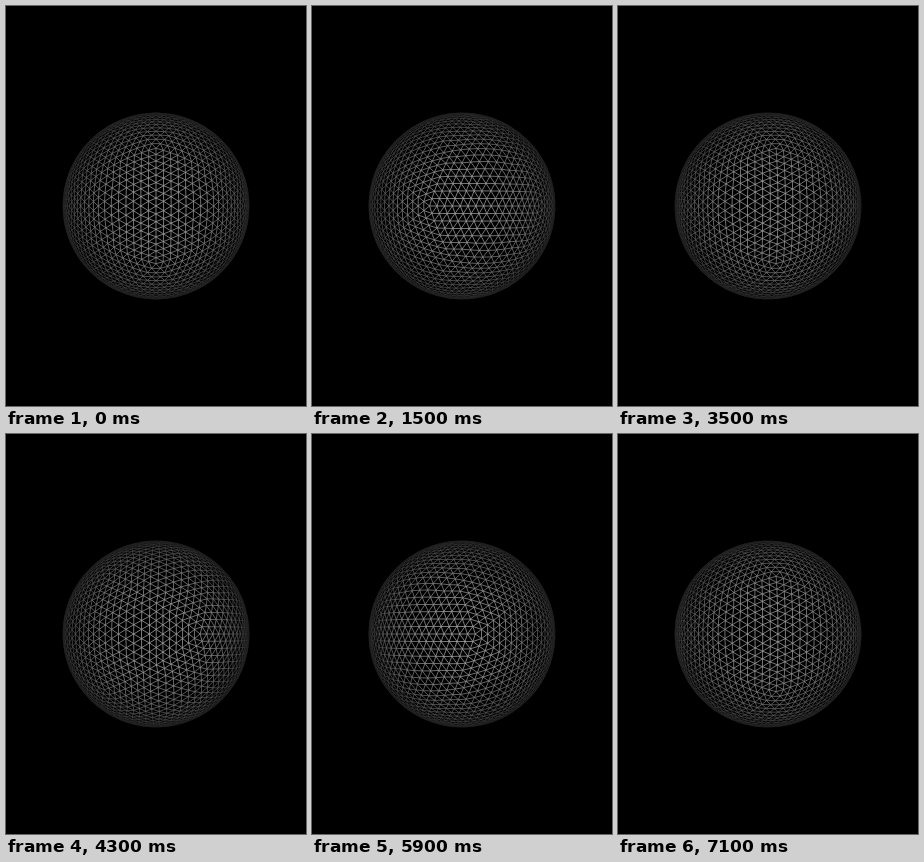
Recreate the animation shown at these times as an HTML page with a canvas. Size 300 by 400 pixels, loop 7.2 s.

```html
<!DOCTYPE html>
<html>
<head>
<meta charset="utf-8">
<style>
html, body { margin: 0; height: 100%; overflow: hidden; background: #000; }
canvas { display: block; }
</style>
</head>
<body>
<canvas id="stage" width="300" height="400"></canvas>
<script>
const ctx = document.getElementById('stage').getContext('2d');
const RADIUS = 93, CAMERA = 5, LEVELS = 4;
const STEP_MS = 100, STEPS = 72;
const FOCAL = RADIUS * Math.sqrt(CAMERA * CAMERA - 1);

const phi = (1 + Math.sqrt(5)) / 2;
const corners = [];
for (const a of [-1, 1]) for (const b of [-phi, phi])
  corners.push([0, a, b], [a, b, 0], [b, 0, a]);

const normalize = p => p.map(v => v / Math.hypot(...p));
const midpoint = (p, q) => normalize(p.map((v, i) => v + q[i]));
const adjacent = (p, q) => Math.abs(Math.hypot(...p.map((v, i) => v - q[i])) - 2) < 0.01;

// Icosphere: every triangle is split in four, with new points pushed onto the sphere.
const edges = new Map();
function addEdge(p, q) {
  const key = p.map((v, i) => Math.round((v + q[i]) * 1e4) + 0).join();
  edges.set(key, [p, q]);
}
function splitFace(a, b, c, level) {
  if (level === 0) {
    addEdge(a, b);
    addEdge(b, c);
    addEdge(c, a);
    return;
  }
  const ab = midpoint(a, b), bc = midpoint(b, c), ca = midpoint(c, a);
  splitFace(a, ab, ca, level - 1);
  splitFace(ab, b, bc, level - 1);
  splitFace(ca, bc, c, level - 1);
  splitFace(ab, bc, ca, level - 1);
}
corners.forEach((a, i) => corners.forEach((b, j) => corners.forEach((c, k) => {
  if (i < j && j < k && adjacent(a, b) && adjacent(b, c) && adjacent(a, c))
    splitFace(normalize(a), normalize(b), normalize(c), LEVELS);
})));

function draw(angle) {
  const cos = Math.cos(angle), sin = Math.sin(angle);
  const project = ([x, y, z]) => {
    const depth = z * cos + x * sin, scale = FOCAL / (CAMERA - depth);
    return [150 + (x * cos - z * sin) * scale, 200 - y * scale, depth];
  };
  ctx.fillStyle = '#000';
  ctx.fillRect(0, 0, 300, 400);
  ctx.lineWidth = 0.7;
  for (const [p, q] of edges.values()) {
    const [x1, y1, d1] = project(p), [x2, y2, d2] = project(q);
    const depth = (d1 + d2) / 2;
    if (depth < 1 / CAMERA) continue;
    const facing = (depth * CAMERA - 1) / (CAMERA - 1);
    const gray = Math.round(30 + 150 * facing ** 1.5);
    ctx.strokeStyle = `rgb(${gray},${gray},${gray})`;
    ctx.beginPath();
    ctx.moveTo(x1, y1);
    ctx.lineTo(x2, y2);
    ctx.stroke();
  }
}

function frame() {
  const step = Math.floor(performance.now() / STEP_MS) % STEPS;
  draw(step / STEPS * 2 * Math.PI);
  requestAnimationFrame(frame);
}
frame();
</script>
</body>
</html>
```
